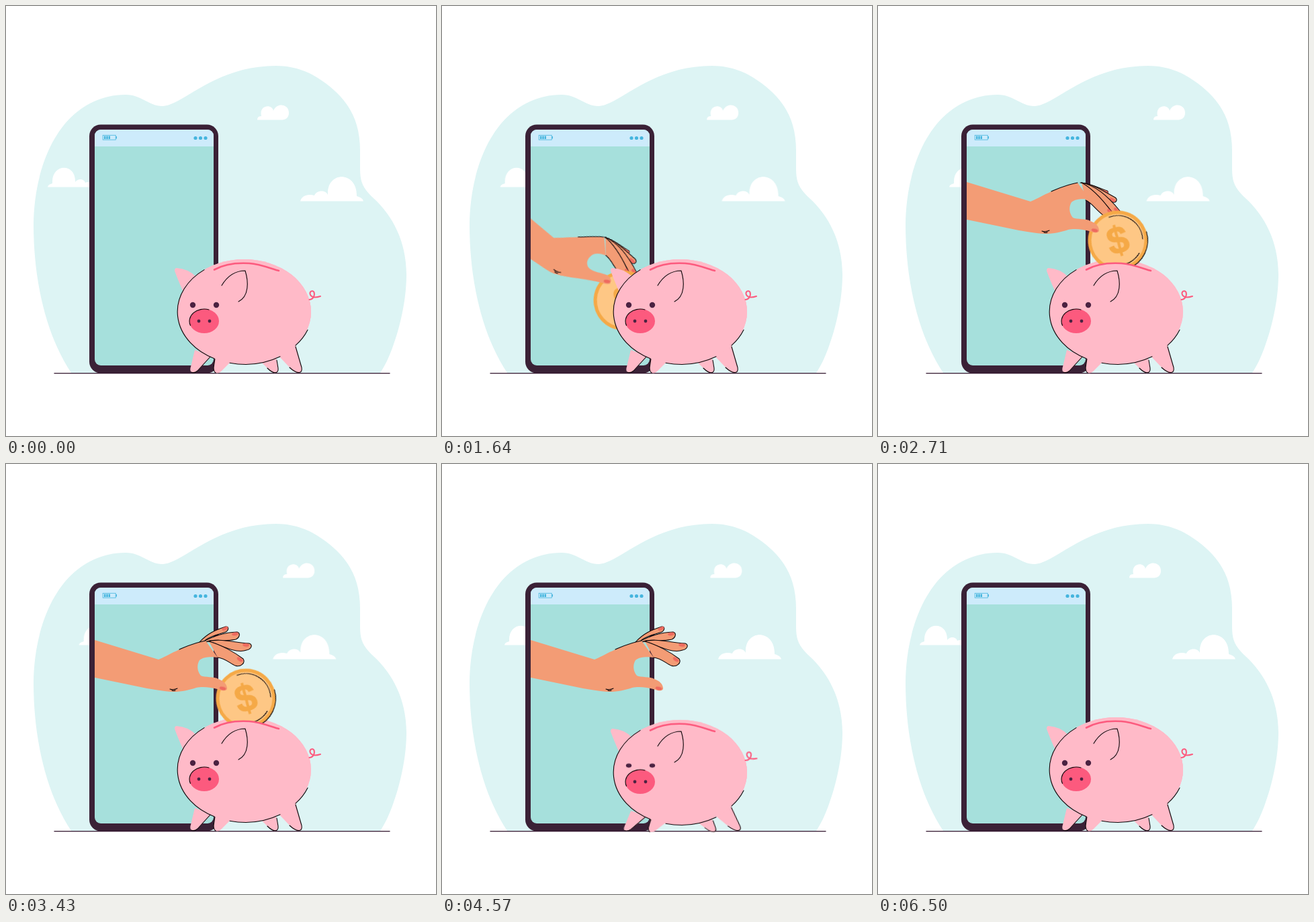
These frames come from a looping animation (640x640 px, 6640 ms). An HTML page without scripts:

```html
<!DOCTYPE html>
<html lang="en">
<head>
<meta charset="utf-8">
<title>Piggy bank</title>
<style>
html, body { margin: 0; width: 100%; height: 100%; overflow: hidden; background: #fff; }
svg { display: block; width: 100%; height: 100%; }
svg * { animation: 6.64s linear infinite; }

.skin { fill: #f39c75; }
.pink { fill: #ffbac8; }
.rose { fill: #fc5a7e; }
.nail { fill: #ee6a5f; }
.dark { fill: #4b2241; }
.ink { stroke: #0b0508; stroke-width: 1.1; stroke-linecap: round; stroke-linejoin: round; }
.line { fill: none; }
.curl { fill: none; stroke: #fc5a7e; stroke-linecap: round; }

/* clouds */
.cloud { fill: #fff; animation-name: drift; animation-delay: -70ms; animation-timing-function: cubic-bezier(.37, 0, .63, 1); }
@keyframes drift { 50% { transform: translateX(var(--dx)); } }

/* pig */
.bob { animation-name: bob; animation-timing-function: ease-in-out; }
@keyframes bob { 0%, 57.5%, 76%, 100% { transform: none; } 67% { transform: translateY(4.3px); } }
.leg { animation-name: splay; animation-timing-function: ease-in-out; }
@keyframes splay {
  0%, 57.5%, 76%, 100% { transform: none; }
  67% { transform: translateY(4.3px) skewX(var(--a)) scaleY(.88); }
}
.eye { transform-box: fill-box; transform-origin: center; animation-name: blink; }
@keyframes blink {
  0%, 12.7%, 23.7%, 66.7%, 78.5%, 100% { transform: none; }
  18.2%, 72.3% { transform: scaleY(.28); }
}
.tail { transform-origin: 451px 437px; animation-name: wag; animation-timing-function: ease-in-out; }
@keyframes wag { 0%, 57.5%, 86%, 100% { transform: none; } 70% { transform: rotate(8deg); } }
.back { animation-name: back; animation-timing-function: step-end; }
@keyframes back { 0%, 64% { opacity: 1; } 39% { opacity: 0; } }

/* hand: reach in, lift, let go, pull out */
.hand { transform-origin: 297px 292px; animation-name: reach; }
@keyframes reach {
  0%, 2.1% { transform: translate(-250px, 42px) rotate(30deg); }
  11.9% { transform: translate(-160px, 60px) rotate(26deg); }
  18.2% { transform: translate(-108px, 69px) rotate(21deg); }
  22.6% { transform: translate(-72px, 67px) rotate(16deg); }
  27.1% { transform: translate(-33px, 36px) rotate(8deg); animation-timing-function: ease-out; }
  32.2% { transform: none; }
  70% { transform: none; animation-timing-function: ease-in; }
  81.8% { transform: translate(-106px, 34.4px) rotate(12deg); }
  88.3% { transform: translate(-194px, 28.6px) rotate(18deg); }
  94.9%, 100% { transform: translate(-264px, 34px) rotate(24deg); }
}
.lift { animation-name: lift; animation-timing-function: ease-in-out; }
@keyframes lift {
  0%, 32.2% { transform: none; }
  40.7%, 44.4% { transform: translate(6px, -29px); }
  51%, 100% { transform: none; }
}
.open { animation-name: open; animation-timing-function: ease-in-out; }
@keyframes open { 0%, 44.4% { d: var(--g); } 51%, 100% { d: var(--o); } }
.palm { animation-name: rise; animation-timing-function: ease-in-out; }
@keyframes rise { 0%, 32.2% { d: var(--g); } 40.7%, 100% { d: var(--o); } }
.tip { animation-name: tip; animation-timing-function: ease-in-out; }
@keyframes tip { 0%, 44.4% { transform: var(--g); } 51%, 100% { transform: var(--o); } }
.thumb { animation-name: thumb; animation-timing-function: ease-in-out; }
@keyframes thumb { 0%, 32.2% { transform: var(--g); } 40.7%, 100% { transform: var(--o); } }

.coin { animation-name: drop; }
@keyframes drop {
  0%, 32.2% { transform: translate(343px, 378px) rotate(-21deg); animation-timing-function: ease-in-out; }
  40.7% { transform: translate(357px, 349px) rotate(-21deg); }
  51.8% { transform: translate(357px, 349px) rotate(-21deg); opacity: 1; animation-timing-function: ease-in; }
  59% { transform: translate(357px, 468px) rotate(-21deg); opacity: 1; }
  59.1%, 100% { transform: translate(357px, 468px) rotate(-21deg); opacity: 0; }
}
.sign { font: bold 57px "Liberation Sans", Arial, sans-serif; text-anchor: middle; fill: #f5a947; stroke: #f5a947; stroke-width: 1; }

#ring {
  --g: path("M295 292C312 293 322 300 335 304C338 306 336 309 332 308C324 305 312 302 304 298");
  --o: path("M288 265C300 252 312 247 327 242C333 242 331 248 327 250C320 253 308 254 297 262");
}
#mid {
  --g: path("M297 292C315 294 332 306 347 314C351 317 349 322 344 321C335 317 322 309 310 303");
  --o: path("M294 264C312 255 325 251 344 250C350 252 347 259 342 261C335 263 325 263 303 263");
}
#long {
  --g: path("M297 292C318 296 338 314 354 334C355 338 349 340 344 338C335 325 320 312 303 305");
  --o: path("M297 265C318 258 338 266 362 267C368 269 365 276 358 277C345 282 325 273 308 266");
}
#index {
  --g: path("M297 292C312 300 328 317 340 333C343 338 338 342 332 342C322 337 313 322 303 318");
  --o: path("M302 264C320 269 340 280 353 290C357 296 349 303 341 300C334 297 326 289 315 288");
}
#palm {
  --g: path("M60 224L222 309C235 306 270 296 295 292L303 318C296 317 288 317 283 322C277 328 276 337 283 342C290 346 303 345 310 346C316 348 319 351 319 355C319 360 313 360 307 359C295 359 283 359 272 360C260 361 250 362 234 361C226 360 218 356 210 353L60 294Z");
  --o: path("M60 240L227 291C240 286 262 271 297 263L315 288C308 287 295 286 288 292C284 298 284 308 290 315C296 318 310 316 316 320C324 323 328 327 329 333C330 338 323 338 318 336C305 332 292 331 283 333C270 337 255 341 236 338C226 337 218 335 210 334L60 303Z");
}
#wrist {
  --g: path("M257 300C270 297 282 293 294 292");
  --o: path("M258 276C270 271 280 266 297 263");
}
#crease {
  --g: path("M232 355Q236 358 243 357M234 358Q237 360 239 359");
  --o: path("M244 335Q249 337 255 334M247 337Q250 338 252 337");
}
#n1 { --g: translate(332px, 306px) rotate(20deg); --o: translate(326px, 245px) rotate(-25deg); }
#n2 { --g: translate(343px, 317.5px) rotate(28deg); --o: translate(341px, 253px) rotate(-8deg); }
#n3 { --g: translate(349px, 333px) rotate(45deg); --o: translate(357px, 269.5px) rotate(8deg); }
#n4 { --g: translate(339px, 335px) rotate(45deg); --o: translate(348px, 291px) rotate(35deg); }
#n5 { --g: translate(313px, 355.5px) rotate(-5deg); --o: translate(322.5px, 334px) rotate(12deg); }
</style>
</head>
<body>
<svg viewBox="0 0 640 640">
  <defs>
    <clipPath id="right"><rect x="132" y="184" width="400" height="351"/></clipPath>
    <clipPath id="front"><path d="M200 300H310V392C325 384 345 382 362 383C378 384 395 391 406 394V300H500V600H200Z"/></clipPath>
    <clipPath id="screen"><rect x="132" y="184" width="177" height="351" rx="9"/></clipPath>
    <ellipse id="body" cx="354.5" cy="455" rx="99.5" ry="78"/>
    <ellipse id="nail" rx="4.8" ry="2.4"/>
  </defs>

  <path fill="#ddf4f4" d="M97 546C60 490 41 410 41 325C42 230 85 133 178 132C202 132 212 149 233 149C262 149 310 89 402 89C432 89 455 100 470 111C505 135 527 165 527 215V240C527 262 530 270 548 287C575 312 596 350 596 400C596 455 575 520 557 546Z"/>
  <path class="cloud" style="--dx:47px" d="M62 269.5C63 265 67 265 69 264C67 234 104 233 103 262C107 256 116 257 118 263C124 260 131 264 132 269.5Z"/>
  <path class="cloud" style="--dx:38.5px" d="M374 169.5C374 165 377 164 380 164C376 147 396 145 398 156C403 143 421 146 421 159C421 166 416 169.5 411 169.5Z"/>
  <path class="cloud" style="--dx:-41px" d="M438 290.5C440 283 448 279 459 282C461 275 475 272 479 281C477 245 523 245 522 283C526 284 531 286 532 290.5Z"/>

  <rect x="124" y="176.5" width="192" height="370" rx="17" fill="#3a2136"/>
  <g clip-path="url(#screen)">
    <rect x="132" y="184" width="177" height="351" fill="#a6e0dc"/>
    <rect x="132" y="184" width="177" height="25" fill="#cdebfb"/>
  </g>
  <g fill="#45b5de">
    <circle cx="282" cy="196.5" r="2.6"/><circle cx="289.5" cy="196.5" r="2.6"/><circle cx="297" cy="196.5" r="2.6"/>
    <path d="M146 193.5h2.4v4.5h-2.4zM149.3 193.5h2.4v4.5h-2.4zM152.6 193.5h2.4v4.5h-2.4zM163.6 194h1.4v3.6h-1.4z"/>
    <rect x="144.2" y="192.3" width="19" height="6.8" fill="none" stroke="#45b5de" stroke-width=".8"/>
  </g>
  <path class="line" stroke="#33172f" stroke-width="1.4" d="M71.500 546.600H571.500"/>

  <use href="#body" class="pink bob"/>

  <g clip-path="url(#right)">
    <g class="hand">
      <g class="lift">
        <path id="ring" class="skin ink open"/>
        <use href="#nail" id="n1" class="nail tip"/>
        <path id="mid" class="skin ink open"/>
        <use href="#nail" id="n2" class="nail tip"/>
        <path id="long" class="skin ink open"/>
        <use href="#nail" id="n3" class="nail tip"/>
        <path id="index" class="skin ink open"/>
        <use href="#nail" id="n4" class="nail tip"/>
      </g>
      <g class="coin">
        <circle r="44.5" fill="#f5a947"/>
        <circle r="39.5" fill="#fec785"/>
        <path class="line ink" d="M44.400 3A44.500 44.500 0 0 1 0 44.500M0 -37A37 37 0 0 1 35.300 11M23 29A37 37 0 0 1 -11 35.300"/>
        <text class="sign" y="19" transform="rotate(6)">$</text>
      </g>
      <path id="palm" class="skin palm"/>
      <path id="wrist" class="line ink palm"/>
      <path id="crease" class="line ink palm"/>
      <use href="#nail" id="n5" class="nail thumb"/>
    </g>
  </g>

  <g class="pink">
    <path class="leg" style="--a:-9deg;transform-origin:290px 514px" d="M281 512L275 537C272 546 279 548 285 543L306 521Z"/>
    <path class="leg" style="--a:-9deg;transform-origin:320px 525px" d="M311 522L309 539C309 547 315 548 320 544L334 530Z"/>
    <path class="leg" style="--a:11deg;transform-origin:392px 525px" d="M380 530L392 542C398 548 406 548 405 539L402 524Z"/>
    <path class="leg" style="--a:9deg;transform-origin:420px 510px" d="M406 521L426 542C433 548 442 548 440 538L431 505Z"/>
  </g>
  <g class="line ink">
    <path class="leg" style="--a:-9deg;transform-origin:290px 514px" d="M305 521L285 543Q280 547 276 545"/>
    <path class="leg" style="--a:-9deg;transform-origin:320px 525px" d="M311 525L309 538Q309 544 312 546"/>
    <path class="leg" style="--a:11deg;transform-origin:392px 525px" d="M403 527L405 539C406 548 398 548 389 539"/>
    <path class="leg" style="--a:9deg;transform-origin:420px 510px" d="M431 507L440 538C442 548 433 548 422 538"/>
  </g>

  <g class="bob">
    <path class="pink" d="M254 390Q271 391 283 403L264 426Q254 403 251 394Q251 390 254 390Z"/>
    <use href="#body" class="pink back"/>
    <g clip-path="url(#front)"><use href="#body" class="pink"/></g>
    <path class="line ink" d="M295 392.600A99.500 78 0 0 0 310 524.700M333 531.200A99.500 78 0 0 0 408 521.800M431 505.200A99.500 78 0 0 0 449 482"/>
    <path class="curl" stroke-width="2.6" d="M310 392.500C325 384 345 382 362 383C378 384 395 391 406 394"/>
    <path class="pink ink" d="M321 416C330 401 343 394 356 394C361 410 362 432 346 440"/>
    <g class="dark">
      <circle class="eye" cx="278" cy="445" r="4.200"/>
      <circle class="eye" cx="313" cy="445" r="4.200"/>
    </g>
    <ellipse class="rose" cx="295" cy="469" rx="22" ry="18"/>
    <path class="line ink" d="M274.500 475.500A22 18 0 0 1 302 452"/>
    <g class="dark">
      <circle cx="287" cy="469" r="2.400"/>
      <circle cx="303" cy="469" r="2.400"/>
    </g>
    <path class="curl tail" stroke-width="2" d="M451.500 437C457 437 460 431 458.500 426C456 422 451 425 453 430C456 435 462 434 468 432"/>
  </g>
</svg>
</body>
</html>
```
